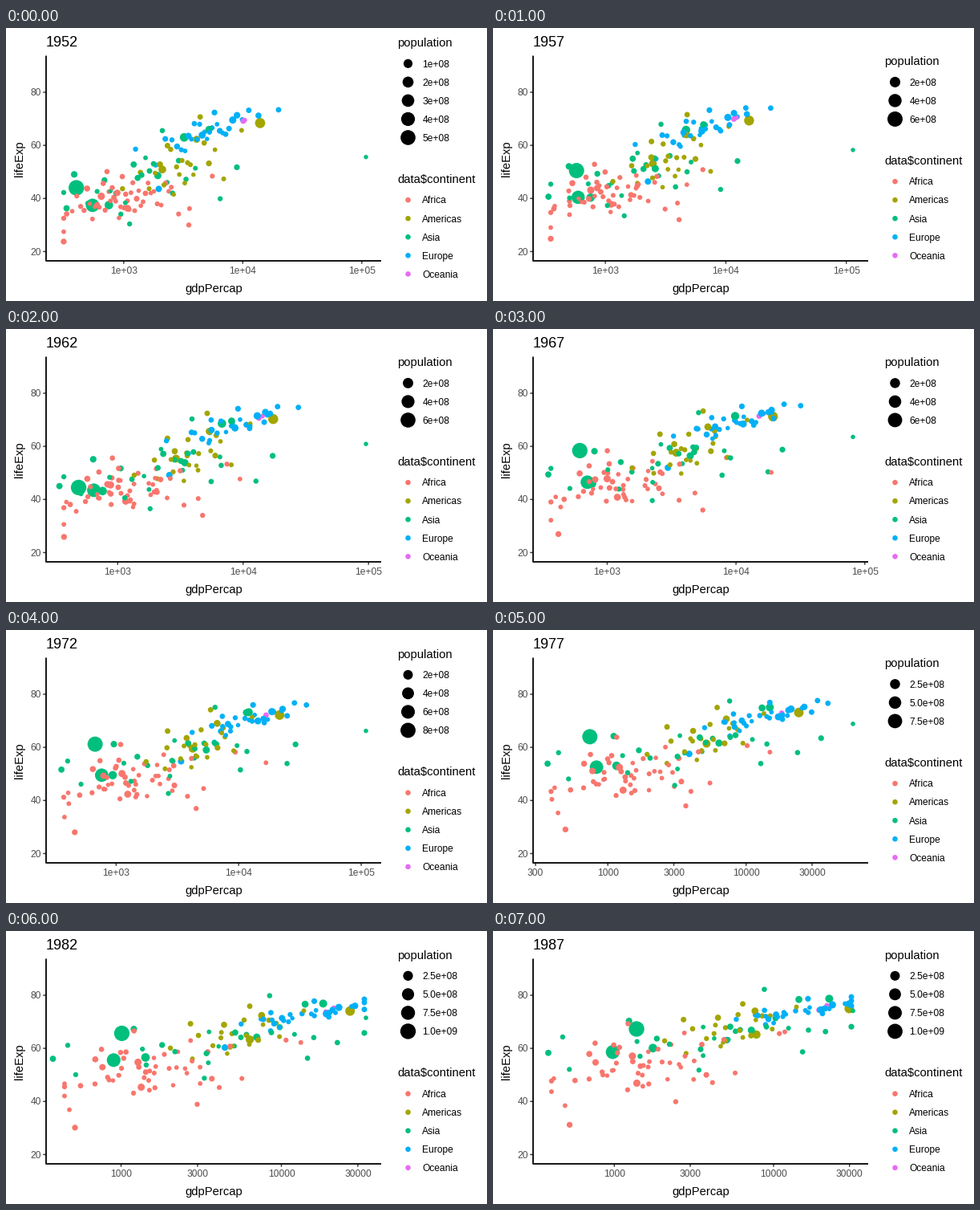
These frames come from a looping animation (600x340 px, 8000 ms). A matplotlib script:

```python
import math

import matplotlib.pyplot as plt
import numpy as np
from matplotlib.animation import FuncAnimation

W, H, DPI = 600, 340, 100
PX = 72 / DPI  # points per pixel
LEFT, RIGHT, TOP, BOTTOM = 50, 468, 34.5, 290
SMALL, MEDIUM, LARGE = 12, 14.8, 18
plt.rcParams["font.family"] = "Liberation Sans"

YEARS = list(range(1952, 1988, 5))
SPAN = YEARS[-1] - YEARS[0]

# income range and largest population (millions) in each year
LOW = [299, 336, 355, 349, 357, 371, 424, 385]
HIGH = [108382, 113523, 95458, 80895, 109348, 59265, 33693, 31541]
TOP_POP = [556.3, 637.4, 665.8, 754.6, 862, 943.5, 1000.3, 1084]

COLOURS = {"Africa": "#F8766D", "Americas": "#A3A500", "Asia": "#00BF7D",
           "Europe": "#00B0F6", "Oceania": "#E76BF3"}

# group: count, link of income and life, typical population, then
# (log income, its spread, life, its spread) at the start and at the end
CLOUDS = {
    "Africa": (49, 0.45, 3.8, (2.96, .30, 39.2, 5.0), (3.16, .34, 53.3, 7.5)),
    "Americas": (23, 0.65, 4.7, (3.49, .23, 53.0, 8.5), (3.73, .22, 67.8, 5.5)),
    "Asia": (25, 0.55, 9.0, (3.15, .36, 47.5, 8.5), (3.65, .46, 65.0, 7.5)),
    "Europe": (29, 0.80, 8.5, (3.70, .26, 65.1, 4.6), (4.18, .23, 74.0, 2.4)),
    "Oceania": (2, 0.90, 6.0, (4.01, .01, 69.3, 0.2), (4.31, .03, 75.3, 1.0)),
}

# dots that stand out: group, population at the start and at the end,
# key points (year, income, life)
LANDMARKS = [
    ("Asia", 556, 1084, [(1952, 400, 44.0), (1957, 576, 50.5), (1962, 488, 44.5),
                         (1967, 613, 58.4), (1977, 741, 64.0), (1987, 1379, 67.3)]),
    ("Asia", 372, 788, [(1952, 547, 37.4), (1987, 977, 58.6)]),
    ("Asia", 82, 169, [(1952, 750, 37.5), (1967, 762, 46.0), (1987, 1748, 60.1)]),
    ("Asia", 86, 122, [(1952, 3217, 63.0), (1967, 9848, 71.4), (1987, 22376, 78.7)]),
    ("Asia", 4, 15, [(1952, 6460, 39.9), (1972, 24837, 53.9), (1987, 21198, 66.3)]),
    ("Asia", 20, 38, [(1952, 331, 36.3), (1967, 349, 49.4), (1987, 385, 58.3)]),
    ("Americas", 157, 243, [(1952, 13990, 68.4), (1987, 29884, 75.0)]),
    ("Americas", 57, 143, [(1952, 2109, 50.9), (1967, 3430, 57.6), (1987, 7807, 65.2)]),
    ("Africa", 33, 82, [(1952, 1077, 36.3), (1987, 1385, 46.9)]),
    ("Africa", 4, 8, [(1952, 3521, 30.0), (1967, 5523, 36.0), (1987, 2430, 39.9)]),
    ("Africa", 1, 4, [(1952, 2388, 42.7), (1967, 18773, 50.2), (1987, 11771, 66.2)]),
    ("Europe", 22, 53, [(1952, 1969, 43.6), (1987, 5089, 63.1)]),
    # the richest dot follows the right end of the axis
    ("Asia", 0.2, 2, [(y, h, 55.6 + 0.53 * (y - 1952)) for y, h in zip(YEARS, HIGH)]),
]

rng = np.random.default_rng(7)


def spread(n):
    """Bell-shaped scores without random clumps, in shuffled order."""
    p = (np.arange(n) + 0.5) / n
    return rng.permutation(np.log(p / (1 - p)) / 1.75)


def mix(a, b, share):
    return share * a + math.sqrt(1 - share ** 2) * b


def build_cloud(n, link, pop, start, end):
    """Start and end rows of log income, life and log population."""
    wealth, health = spread(n), spread(n)
    size = np.clip(math.log(pop) + 1.1 * spread(n), math.log(0.2), math.log(60))
    poses = []
    for (x, dx, y, dy), growth in ((start, -0.35), (end, 0.3)):
        poses.append(np.array([x + dx * wealth, y + dy * mix(wealth, health, link),
                               size + growth]))
        # every dot strays a little on its way
        wealth, health = mix(wealth, spread(n), 0.92), mix(health, spread(n), 0.92)
    return poses


STARTS, ENDS = (np.hstack(p) for p in zip(*(build_cloud(*c) for c in CLOUDS.values())))
CLOUD_COLOURS = [COLOURS[g] for g, c in CLOUDS.items() for _ in range(c[0])]
ORDER = rng.permutation(len(CLOUD_COLOURS))
DOT_COLOURS = [COLOURS[m[0]] for m in LANDMARKS] + [CLOUD_COLOURS[k] for k in ORDER]


def landmark_pose(year, start_pop, end_pop, keys):
    years, income, life = np.array(keys).T
    u = (year - YEARS[0]) / SPAN
    return (np.interp(year, years, np.log10(income)), np.interp(year, years, life),
            start_pop * (end_pop / start_pop) ** u)


def pose(year, low, high):
    """Log income, life and population of every dot."""
    u = (year - YEARS[0]) / SPAN
    ease = np.array([[math.sin(u * math.pi / 2)], [u], [u]])  # income slows down
    x, y, size = (STARTS + (ENDS - STARTS) * ease)[:, ORDER]
    cloud = np.array([np.clip(x, low + 0.02, high - 0.01), y, np.exp(size)])
    marks = np.array([landmark_pose(year, *m[1:]) for m in LANDMARKS]).T
    return np.hstack([marks, cloud])


fig = plt.figure(figsize=(W / DPI, H / DPI), dpi=DPI, facecolor="white")
ax = fig.add_axes([0, 0, 1, 1])


def life_y(v):
    return BOTTOM - (v - 16.5) * 3.307


def radius(size):
    return size * 1.4225 + 1.15


def pop_radius(pop, top):
    return radius(1 + 5 * np.sqrt(np.minimum(pop / top, 1)))


def dots(x, y, r, colour):
    ax.scatter(x, y, s=(2 * np.asarray(r) * PX) ** 2, c=colour, linewidths=0)


def label(x, y, s, px, colour="black", **kw):
    ax.text(x, y, s, fontsize=px * PX, color=colour, va="baseline", **kw)


def line(xs, ys, colour, px):
    ax.plot(xs, ys, color=colour, lw=px * PX, solid_capstyle="butt", snap=False)


def draw_axes(year, log_x):
    for v in (20, 40, 60, 80):
        y = life_y(v)
        line([46.3, LEFT], [y, y], "#333333", 1.42)
        label(43.8, y + 4.2, str(v), SMALL, "#4D4D4D", ha="right")
    sci = year <= 1972
    for v in (1e3, 1e4, 1e5) if sci else (300, 1000, 3000, 10000, 30000):
        x = log_x(math.log10(v))
        if LEFT <= x <= RIGHT:
            line([x, x], [BOTTOM, 293.7], "#333333", 1.42)
            text = f"{v:.0e}" if sci else str(v)
            label(x, 306.5, text, SMALL, "#4D4D4D", ha="center")
    line([LEFT, LEFT, RIGHT], [TOP, BOTTOM, BOTTOM], "black", 1.8)
    label(LEFT, 23, str(year), LARGE)
    label(258.8, 329, "gdpPercap", MEDIUM, ha="center")
    label(21, 162.8, "lifeExp", MEDIUM, ha="center",
          rotation=90, rotation_mode="anchor")


def draw_legend(title, y, names, radii, colours):
    label(488.2, y - 21.2, title, MEDIUM)
    ys = y + 23.04 * np.arange(len(names))
    dots(np.full(len(names), 501.5), ys, radii, colours)
    for name, key_y in zip(names, ys):
        label(519.4, key_y + 4.3, name, SMALL)


def draw(i):
    year, top = YEARS[i], TOP_POP[i]
    low, high = math.log10(LOW[i]), math.log10(HIGH[i])
    ax.clear()
    ax.set(xlim=(0, W), ylim=(H, 0))
    ax.axis("off")

    def log_x(v):
        return LEFT + (RIGHT - LEFT) * (0.5 + 10 * (v - low) / (high - low)) / 11

    income, life, pop = pose(year, low, high)
    dots(log_x(income), life_y(life), pop_radius(pop, top), DOT_COLOURS)
    draw_axes(year, log_x)

    step = 100 if year == 1952 else 200 if year <= 1972 else 250
    breaks = np.arange(step, top, step)
    digits = 1 if step == 250 else 0
    shift = 11.52 * (5 - len(breaks))
    draw_legend("population", 44.3 + shift,
                [f"{b * 1e6:.{digits}e}" for b in breaks],
                pop_radius(breaks, top), "black")
    draw_legend("data$continent", 214.2 - shift, list(COLOURS),
                radius(1.5), list(COLOURS.values()))
    return []


anim = FuncAnimation(fig, draw, frames=len(YEARS), interval=1000,
                     repeat=True, repeat_delay=0)
plt.show()
```
